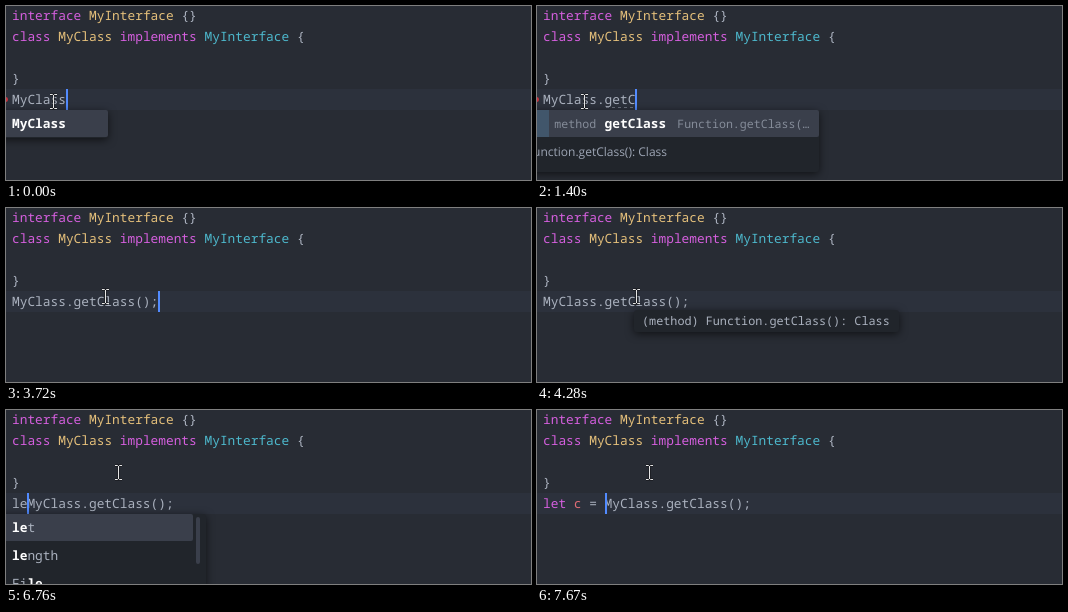
Write an HTML page with a canvas that moves like this. It is 525 px wide and 174 px high and loops after 8000 ms.

```html
<!DOCTYPE html>
<html lang="en">
<head>
<meta charset="utf-8">
<title>Editor typing</title>
<style>
html, body { margin: 0; width: 100%; height: 100%; overflow: hidden; background: #282c34; }
canvas { display: block; }
</style>
</head>
<body>
<canvas id="stage" width="525" height="174"></canvas>
<script>
const ctx = document.getElementById('stage').getContext('2d');
const LOOP = 8000, LEFT = 6, CELL = 7.7, LINE = 21, ROW = 28, LIST_TOP = 104;
const MONO = '"Noto Sans Mono", "DejaVu Sans Mono", monospace';
const CODE = `12.83px ${MONO}`, BOLD = `bold ${CODE}`, SMALL = `11.6px ${MONO}`;
const color = {
  bg: '#282c34', line: '#2c313c', panel: '#21252b', pick: '#3a3f4b', mark: '#41566b',
  text: '#abb2bf', dim: '#858c99', key: '#d55fde', type: '#e5c07b', iface: '#4db8cc',
  name: '#e06c75', caret: '#528bff', error: '#c8323c'
};

// Rows are [name, kind, detail]; <> encloses the matched letters.
const method = (name, label) => [label || name, 'method', `Function.${name}(…`];
const getClass = method('getClass', '<getClass>');
const lists = {
  own: { col: 0, width: 102, rows: [['<MyClass>']] },
  members: { col: 8, width: 282, bar: true, rows: [method('apply'), method('bind'), method('call')] },
  g: { col: 8, width: 282, rows: [getClass, ['ar<g>uments', 'property']] },
  get: { col: 8, width: 282, rows: [getClass], doc: 'Function.getClass(): Class' },
  le: { col: 0, width: 200, bar: true, rows: [['<le>t'], ['<le>ngth'], ['Fi<le>']] },
  let: { col: 0, width: 243, rows: [['<let>'], ['de<let>e']] },
  c: { col: 4, width: 201, rows: [['<c>MyClass', 'variable', 'let cMyClass']] }
};

// [start, typed line with | as visible caret, open list]
const call = 'MyClass.getClass();';
const steps = [
  [0, 'MyClass|', 'own'], [90, 'MyClass.|'], [150, 'MyClass.|', 'members'],
  [400, 'MyClass.g|', 'members'], [480, 'MyClass.g|', 'g'], [620, 'MyClass.ge|', 'g'],
  [1040, 'MyClass.get|', 'g'], [1130, 'MyClass.get|', 'get'],
  [1400, 'MyClass.getC|', 'get'], [1460, 'MyClass.getCl|', 'get'],
  [1540, 'MyClass.getCla|', 'get'], [1720, 'MyClass.getClas|', 'get'],
  [1810, 'MyClass.getClass|'], [2270, 'MyClass.getClass'],
  [2450, 'MyClass.getClass(|'], [2530, 'MyClass.getClass(|)'],
  [2610, 'MyClass.getClass()|'], [2690, call + '|'],
  [3120, call], [3640, call + '|'], [4280, call], [4710, call + '|'], [5110, call],
  [5360, '|' + call], [5820, call], [6220, '|' + call],
  [6500, 'l|' + call], [6580, 'le|' + call], [6760, 'le|' + call, 'le'],
  [6850, 'let|' + call, 'le'], [6920, 'let|' + call, 'let'], [7000, 'let |' + call],
  [7180, 'let c|' + call], [7260, 'let c|' + call, 'c'], [7330, 'let c |' + call],
  [7520, 'let c =|' + call], [7670, 'let c = |' + call]
];

const mouse = [
  [0, 47, 95], [3400, 52, 95], [3480, 65, 93], [3560, 81, 91], [3640, 93, 89], [3720, 99, 88],
  [5670, 102, 82], [5745, 108, 71], [5820, 112, 62]
];

const at = (list, t) => list.findLast(item => item[0] <= t);
const colX = col => LEFT + col * CELL;

function box(x, y, w, h, fill, radius = 0) {
  ctx.fillStyle = fill;
  ctx.beginPath();
  ctx.roundRect(x, y, w, h, radius);
  ctx.fill();
}

function label(text, x, y, fill, font = CODE, align = 'left') {
  ctx.font = font;
  ctx.fillStyle = fill;
  ctx.textAlign = align;
  ctx.fillText(text, x, y);
}

function code(row, ...parts) {
  let col = 0;
  for (const [text, fill] of parts) {
    label(text, colX(col), 14 + row * LINE, fill);
    col += text.length;
  }
}

function panel(x, y, w, h) {
  ctx.save();
  ctx.shadowColor = 'rgba(0,0,0,.6)';
  ctx.shadowBlur = 8;
  ctx.shadowOffsetY = 2;
  box(x, y, w, h, color.panel, 3);
  ctx.restore();
}

function drawList({ col, width, rows, doc, bar }) {
  const x = colX(col), height = rows.length * ROW + (doc ? 34 : 0);
  panel(-20, LIST_TOP, width + 20, height);
  box(-4, LIST_TOP, width + 4 - (bar ? 13 : 0), ROW - 1, color.pick, 2);
  if (bar) box(190, LIST_TOP + 3, 4, 47, color.pick, 2);
  if (doc) {
    box(0, LIST_TOP, 12, ROW - 1, color.mark);
    label(doc, 130, 150, '#9da5b4', '12px "Open Sans", sans-serif', 'right');
  }
  rows.forEach(([name, kind, detail], i) => {
    const y = 122 + i * ROW;
    let pos = 0;
    name.split(/[<>]/).forEach((part, j) => {
      const hit = j % 2;
      label(part, x + pos * CELL, y, hit ? '#fff' : color.text, hit ? BOLD : CODE);
      pos += part.length;
    });
    if (kind) label(kind, x - 8.5, y, color.dim, SMALL, 'right');
    if (detail) label(detail, x + pos * CELL + 11, y, color.dim, SMALL);
  });
}

function drawHint(t) {
  if (t < 3960 || t >= 5360) return;
  ctx.globalAlpha = t < 4040 ? 0.35 : t < 4130 ? 0.7 : 1;
  panel(97, 102, 265, 22);
  label('(method) Function.getClass(): Class', 105, 117, color.text, `11.8px ${MONO}`);
  ctx.globalAlpha = 1;
}

function drawMouse([, x, y]) {
  const beam = new Path2D(`M${x - 3} ${y - 6.5}h2.5l1 1l1-1h2.5M${x + .5} ${y - 6}v13M${x - 3} ${y + 7.5}h2.5l1-1l1 1h2.5`);
  for (const [stroke, width] of [['rgba(20,22,26,.7)', 2.5], ['#e6e6e6', 1]]) {
    ctx.strokeStyle = stroke;
    ctx.lineWidth = width;
    ctx.stroke(beam);
  }
}

function draw(t) {
  const [, typed, open] = at(steps, t);
  const caret = typed.indexOf('|'), line = typed.replace('|', '');
  box(0, 0, 525, 174, color.bg);
  box(0, 83, 525, 21, color.line);
  code(0, ['interface ', color.key], ['MyInterface', color.type], [' {}', color.text]);
  code(1, ['class ', color.key], ['MyClass ', color.type], ['implements ', color.key],
    ['MyInterface', color.iface], [' {', color.text]);
  code(3, ['}', color.text]);
  if (line.startsWith('let ')) {
    const named = line[4] === 'c' ? 1 : 0;
    code(4, ['let ', color.key], [line.slice(4, 4 + named), color.name],
      [line.slice(4 + named), color.text]);
  } else code(4, [line, color.text]);
  if (t < 1810) box(-3, 91, 5, 5, color.error, 2.5);
  if (open === 'get') for (let i = 0; i < 5; i++) box(69 + i * 6, 101, 3, 1, '#6b717d');
  if (caret >= 0) box(Math.round(colX(caret)), 83, 2, 21, color.caret);
  if (open) drawList(lists[open]);
  drawHint(t);
  drawMouse(at(mouse, t));
}

ctx.textRendering = 'geometricPrecision';
let start;
function frame(now) {
  start ??= now;
  draw(Math.max(0, now - start) % LOOP);
  requestAnimationFrame(frame);
}
requestAnimationFrame(frame);
</script>
</body>
</html>
```
